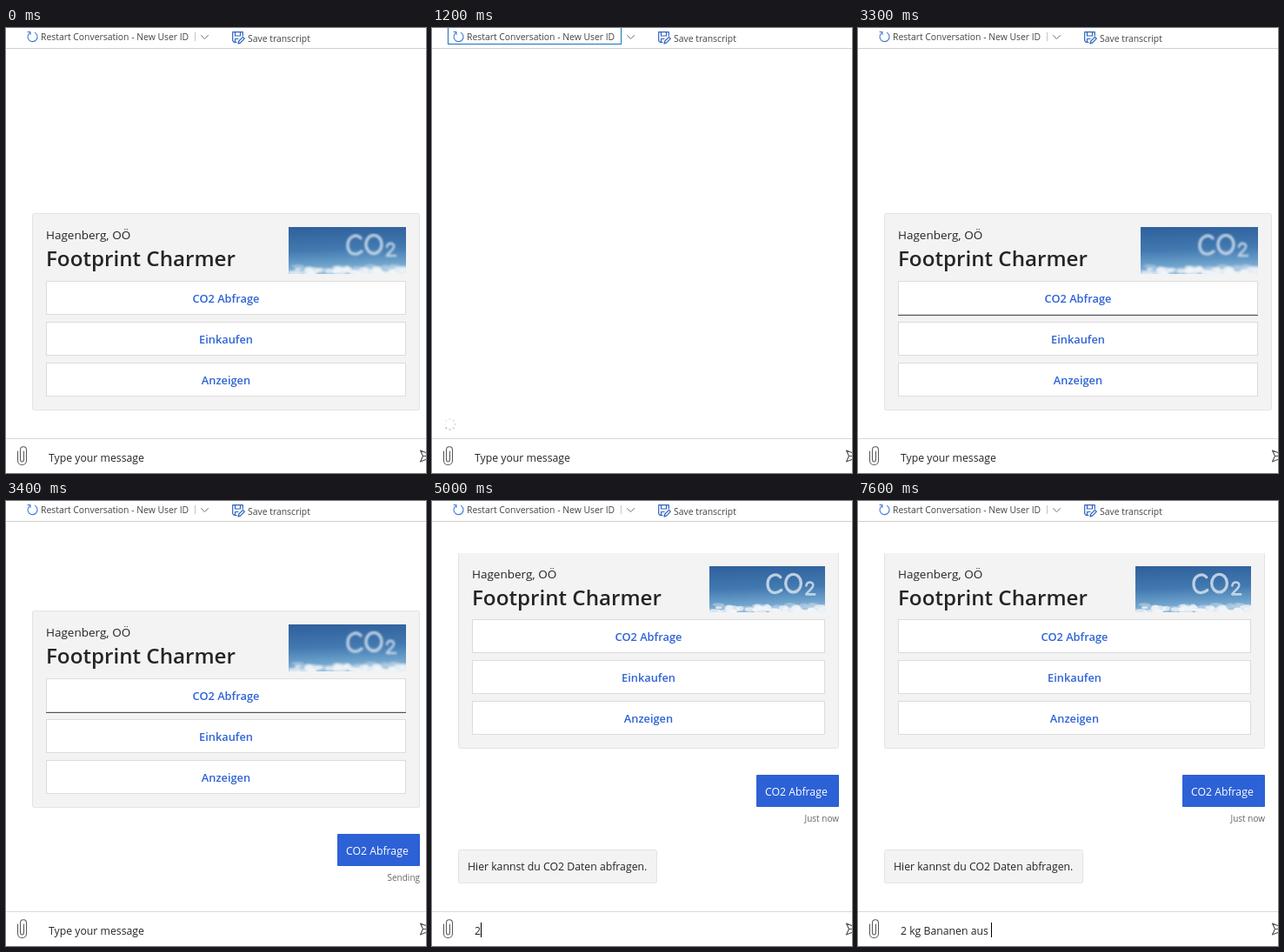
An HTML page for the animation above (8000 ms loop, 483 by 512 pixels).

```html
<!DOCTYPE html>
<html lang="de">
<head>
<meta charset="utf-8">
<title>Chat</title>
<style>
  html, body { margin: 0; width: 100%; height: 100%; overflow: hidden; background: #fff; }
  svg { display: block; }
  #stage { width: 483px; height: 512px; font-family: 'Open Sans', 'Noto Sans', sans-serif; fill: #252525; }
  text { white-space: pre; }
  .bar { font-size: 10.4px; fill: #444; }
  .place { font-size: 13.5px; }
  .title { font-size: 24.2px; font-weight: 600; }
  .label { font-size: 12.8px; font-weight: 600; fill: #2e63d5; text-anchor: middle; }
  .msg { font-size: 12.25px; }
  .note { font-size: 10px; fill: #666; text-anchor: end; }
  .line { fill: none; stroke-linecap: round; stroke-linejoin: round; }
  .hide { display: none; }
</style>
</head>
<body>
<svg id="stage" viewBox="0 0 483 512">
  <defs>
    <linearGradient id="sky" x1=".1" y1="0" x2=".2" y2="1">
      <stop offset="0" stop-color="#2f609c"/>
      <stop offset=".5" stop-color="#4279b0"/>
      <stop offset=".8" stop-color="#6a9fca"/>
      <stop offset="1" stop-color="#8fb9d9"/>
    </linearGradient>
    <filter id="soft"><feGaussianBlur stdDeviation=".8"/></filter>
    <clipPath id="view"><rect y="60" width="483" height="412"/></clipPath>
    <symbol id="photo" viewBox="0 0 135 54" preserveAspectRatio="none">
      <rect width="135" height="54" fill="url(#sky)"/>
      <g id="clouds" filter="url(#soft)"></g>
      <g class="line" stroke="#d3e0ec" stroke-width="3.4" opacity=".85" filter="url(#soft)">
        <path d="M83 13C78 7 68 11 68 21C68 31 77 34 84 28"/>
        <ellipse cx="98" cy="20" rx="9" ry="10.5"/>
        <path d="M113 23C114 17 122 18 121 23C120 27 115 29 113 33H123" stroke-width="2.6"/>
      </g>
    </symbol>
  </defs>

  <g clip-path="url(#view)">
    <g id="chat"></g>
  </g>
  <g id="spin" fill="#c8c8c8"></g>

  <path d="M0 23.5H483" stroke="#cfcfcf"/>
  <rect id="tab" x="18.5" y="-1.5" width="199" height="20"/>
  <g class="line" stroke="#4179d6" stroke-width="1.1">
    <path d="M27.4 5.6A5.5 5.5 0 1 0 33.4 5.4"/>
    <path d="M25 4.5H28V7.5"/>
  </g>
  <text id="restart" class="bar" x="40" y="14">Restart Conversation - New User ID</text>
  <path id="split" d="M217.5 5V15" stroke="#c4c4c4"/>
  <path class="line" d="M224.5 8.5L228.5 12.5L232.5 8.5" stroke="#777"/>
  <g class="line" stroke="#2f62bd" stroke-width="1.2">
    <path d="M265 16.5H262.5L260.7 14.7V4.7H272.3V9"/>
    <path d="M263.5 5V9H269.5V5M263.5 16V12.5H267"/>
    <path d="M267 18L267.8 15L272.5 10.3L274.3 12.1L269.7 16.9Z"/>
  </g>
  <text class="bar" x="278" y="16">Save transcript</text>

  <path d="M0 472.5H483" stroke="#d9d9d9"/>
  <path class="line" stroke="#5a5a5a" stroke-width="1.1"
    d="M13.5 487V497.5C13.5 504.5 23.5 504.5 23.5 497.5V485.5C23.5 480.5 16.5 480.5 16.5 485.5V496.5C16.5 499.8 20.5 499.8 20.5 496.5V487"/>
  <path class="line" stroke="#555" stroke-width="1.2" d="M476.5 486L493 492.5L476.5 499L479.5 492.5ZM479.5 492.5H493"/>
  <text id="entry" class="msg" x="49" y="499"></text>
  <rect id="caret" y="485" width="1" height="17" fill="#000"/>
</svg>

<script>
const $ = id => document.getElementById(id);
const LOOP = 8000;

function add(parent, tag, attrs, content = '') {
  const el = document.createElementNS('http://www.w3.org/2000/svg', tag);
  for (const k in attrs) el.setAttribute(k, attrs[k]);
  el.textContent = content;
  return parent.appendChild(el);
}
const box = (p, x, y, w, h, fill, stroke, rx = 0) =>
  add(p, 'rect', { x: x + .5, y: y + .5, width: w - 1, height: h - 1, fill, stroke, rx });
const label = (p, cls, x, y, s) => add(p, 'text', { class: cls, x, y }, s);
const show = (el, on) => el.classList.toggle('hide', !on);

// Cloud bank: hazy puffs behind, brighter ones in front
let seed = 7;
const rnd = () => (seed = seed * 16807 % 2147483647) / 2147483647;
for (let i = 0; i < 70; i++) {
  const front = i >= 30;
  add($('clouds'), 'ellipse', {
    cx: rnd() * 135, cy: (front ? 48 : 45) + rnd() * 7,
    rx: 3 + rnd() * 6, ry: 1.5 + rnd() * 2.5,
    fill: front ? '#f1f5f8' : '#b5cfe3', opacity: front ? .75 : .6
  });
}

for (let i = 0; i < 8; i++) {
  const a = i * Math.PI / 4;
  add($('spin'), 'circle', { cx: 20.5 + 6 * Math.cos(a), cy: 456 + 6 * Math.sin(a), r: 1.2, opacity: .2 + i * .1 });
}

// The transcript, laid out for a given right edge; d lifts everything below the picture
function layout(right, d, status) {
  const g = add($('chat'), 'g', {});
  const inner = right - 16, mid = (46 + inner) / 2;
  box(g, 30, 0, right - 30, 227 - d, '#f3f3f3', '#e3e3e3', 2);
  label(g, 'place', 46, 30, 'Hagenberg, OÖ');
  label(g, 'title', 46, 61, 'Footprint Charmer');
  const w = 135 - 2 * d, h = 54 - d;
  add(g, 'use', { href: '#photo', x: inner - w, y: 16, width: w, height: h });
  ['CO2 Abfrage', 'Einkaufen', 'Anzeigen'].forEach((s, i) => {
    const y = 78 - d + 47 * i;
    box(g, 46, y, inner - 46, 39, '#fff', '#dcdcdc');
    label(g, 'label', mid, y + 25, s);
  });
  const mark = add(g, 'path', { d: `M46 ${117.5 - d}H${inner}` });

  const sent = add(g, 'g', {});
  add(sent, 'rect', { x: right - 95, y: 257 - d, width: 95, height: 37, fill: '#2d61d6', rx: 1 });
  add(sent, 'text', { class: 'msg', x: right - 85, y: 281 - d, fill: '#fff' }, 'CO2 Abfrage');
  label(sent, 'note', right, 311 - d, status);

  const reply = add(g, 'g', {});
  box(reply, 30, 343 - d, 229, 39, '#f3f3f3', '#e3e3e3', 2);
  label(reply, 'msg', 41, 367 - d, 'Hier kannst du CO2 Daten abfragen.');
  return { g, mark, sent, reply };
}
const wide = layout(476, 0, 'Sending');
const slim = layout(468, 1, 'Just now');

// Each step changes only what it names
const steps = [
  [0, { top: 213, card: true, slim: false, tab: 'idle', mark: 'none', sent: false, spin: false, caret: false }],
  [600, { tab: 'hover' }],
  [1000, { tab: 'down' }],
  [1100, { tab: 'focus', card: false, spin: true }],
  [1300, { card: true, top: 181 }],
  [1500, { top: 213, spin: false }],
  [3300, { tab: 'idle', mark: '#4b5554' }],
  [3400, { top: 126, sent: true }],
  [4100, { top: 113, slim: true, mark: '#0f7fc0' }],
  [4200, { top: 86 }],
  [4300, { top: 59 }],
  [4600, { mark: 'none', caret: true }]
];
const typed = '2 kg Bananen aus ';
const keys = [50, 52, 56, 57, 58, 60, 61, 63, 65, 66, 67, 69, 71, 73, 74, 75, 76];

const tabs = {
  idle: ['none', 'none', '#444'],
  hover: ['none', 'none', '#222'],
  down: ['#d6d6d6', 'none', '#222'],
  focus: ['#fff', '#1674b8', '#444']
};

function draw(t) {
  const s = {};
  for (const [at, change] of steps) if (at <= t) Object.assign(s, change);

  $('chat').setAttribute('transform', `translate(0 ${s.top})`);
  show(wide.g, s.card && !s.slim);
  show(slim.g, s.slim);
  for (const v of [wide, slim]) {
    v.mark.setAttribute('stroke', s.mark);
    show(v.sent, s.sent);
    show(v.reply, s.slim);
  }

  const [fill, stroke, ink] = tabs[s.tab];
  $('tab').setAttribute('fill', fill);
  $('tab').setAttribute('stroke', stroke);
  $('restart').style.fill = ink;
  show($('split'), s.tab === 'idle' || s.tab === 'hover');

  show($('spin'), s.spin);
  $('spin').setAttribute('transform', `rotate(${Math.floor(t / 100) * 45} 20.5 456)`);

  const n = keys.filter(k => k * 100 <= t).length;
  const entry = $('entry');
  entry.textContent = n ? typed.slice(0, n) : 'Type your message';
  show($('caret'), s.caret);
  $('caret').setAttribute('x', 49 + (n ? Math.round(entry.getComputedTextLength()) : 0));
}

const start = performance.now();
function tick() {
  draw((performance.now() - start) % LOOP);
  requestAnimationFrame(tick);
}
tick();
</script>
</body>
</html>
```
